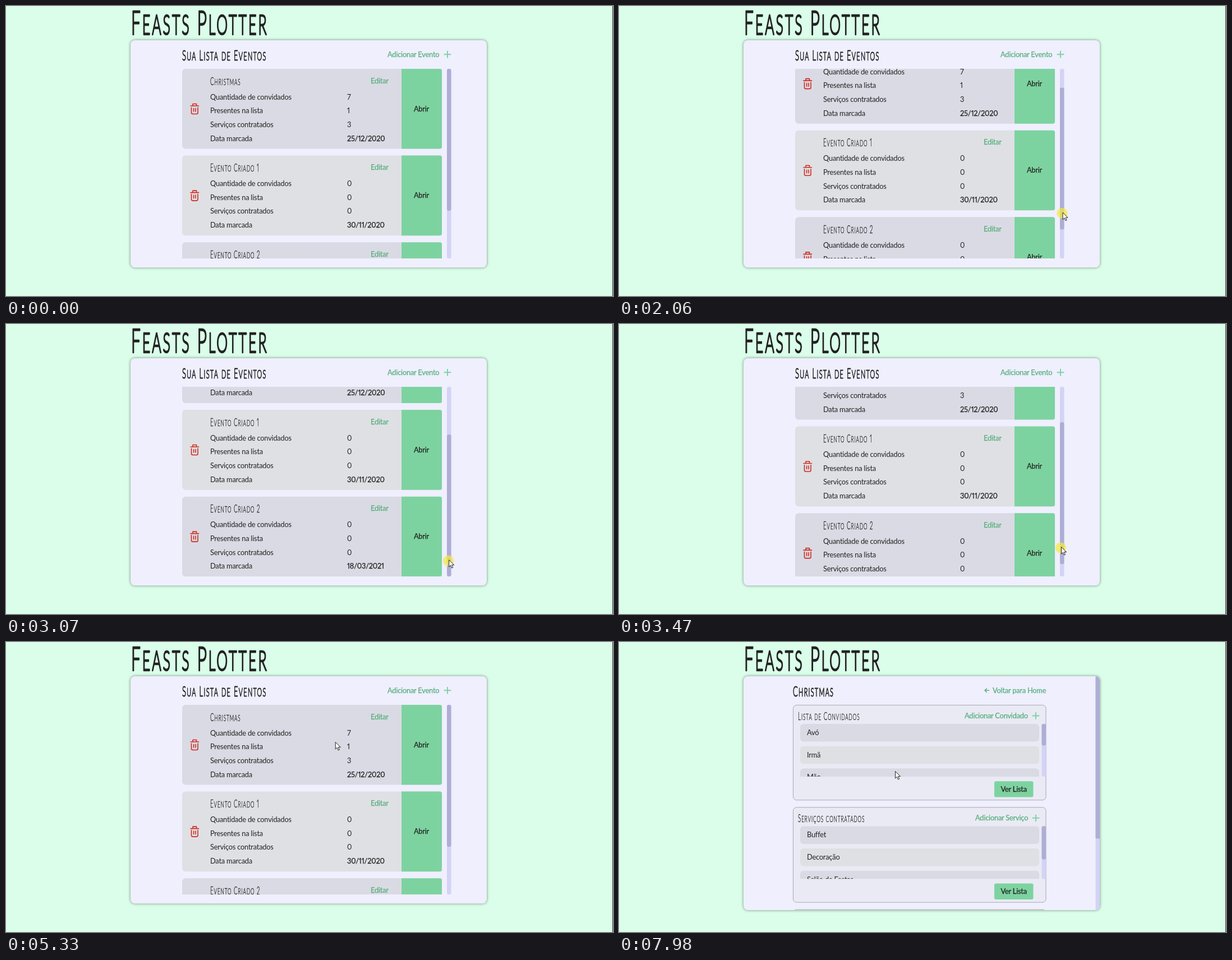
Recreate the animation shown at these times as an HTML page. Size 1082 px wide and 517 px high, loop 8000 ms.

```html
<!DOCTYPE html>
<html lang="pt-BR">
<head>
<meta charset="utf-8">
<title>Lista de Eventos</title>
<style>
  html, body { margin: 0; width: 100%; height: 100%; overflow: hidden; background: #dafee9; }
  svg { display: block; width: 1082px; height: 517px; }
  text { font: 12.8px Lato, sans-serif; letter-spacing: -.2px; font-variant-numeric: proportional-nums; fill: #222; }
  .semi { stroke: #222; stroke-width: .25px; }
  .link { fill: #55ae7c; stroke: #55ae7c; stroke-width: .25px; }
  .mid { text-anchor: middle; }
  .hand { font-weight: 300; letter-spacing: .1em; stroke: #222; stroke-width: .02em; stroke-linejoin: round; }
  .bold { stroke-width: .045em; }
  .panel { fill: #efeffe; filter: drop-shadow(0 0 2.5px #0007); }
  .plus { stroke: #7dd3a0; stroke-width: 2; }
  .trash { fill: none; stroke: #cf2a1e; stroke-width: 1.6; stroke-linecap: round; stroke-linejoin: round; }
  .status { font: 9px "Open Sans", sans-serif; letter-spacing: 0; fill: #fff; }
</style>
</head>
<body>
<svg id="stage" viewBox="0 0 1082 517"></svg>
<script>
const GREEN = '#7dd3a0', ODD = '#dadae4', EVEN = '#dfe0e4', TRACK = '#d3d3f5', THUMB = '#aeaed5';
const LOOP = 8000, DRAG_START = 1620, DRAG_END = 4400, CLICK = 6100, CLICK_END = 6250;
const PAGE_AT = 6350, TITLE_AT = 6510, LIST_TOP = 112, GRAB_Y = 334, THUMB_ROOM = 85;
const CONTENT_RATIO = 338 / 253;

const rect = (x, y, w, h, fill, rx = 0, extra = '') =>
  `<rect x="${x}" y="${y}" width="${w}" height="${h}" fill="${fill}" rx="${rx}" ${extra}/>`;
const text = (x, y, label, cls = '') => `<text x="${x}" y="${y}" class="${cls}">${label}</text>`;
const plus = (x, y) => `<path class="plus" d="M${x - 6.3} ${y}h12.6M${x} ${y - 6.3}v12.6"/>`;
const clip = (id, x, y, w, h, rx = 0) => `<clipPath id="${id}">${rect(x, y, w, h, '#000', rx)}</clipPath>`;

// Narrow handwritten-style face: tall capitals followed by slightly smaller ones.
function hand(x, y, size, label, cls = '') {
  const caps = label.replace(/[a-zà-ú]+/g, s => `<tspan font-size=".84em">${s.toUpperCase()}</tspan>`);
  return `<g transform="translate(${x} ${y}) scale(.5 1)">` +
    `<text class="hand ${cls}" style="font-size:${size}px">${caps}</text></g>`;
}

function eventCard(name, values, index) {
  const labels = ['Quantidade de convidados', 'Presentes na lista', 'Serviços contratados', 'Data marcada'];
  const rows = labels.map((label, i) => {
    const y = 54.5 + i * 24.7;
    return text(364, y, label) + text(608, y, values[i], i === 3 ? 'semi' : '');
  }).join('');
  return `<g transform="translate(0 ${LIST_TOP + index * 154.6})">
    ${rect(314, 0, 463, 142.6, index % 2 ? EVEN : ODD, 6)}
    <path fill="${GREEN}" d="M705 0h68.5q3.5 0 3.5 3.5v135.6q0 3.5 -3.5 3.5h-68.5z"/>
    <path class="trash" d="M329 66h14.5M333 65.5v-3h6.5v3M330.5 69v9q0 2.5 2.5 2.5h6.5q2.5 0 2.5 -2.5v-9M334.6 70.5v5.5M338 70.5v5.5"/>
    ${hand(364, 28.5, 19.4, name)}${text(650, 25.5, 'Editar', 'link')}
    ${text(740.5, 75.5, 'Abrir', 'semi mid')}${rows}</g>`;
}

function listBox(id, y, title, action, actionX, items, thumb) {
  const rows = items.map((item, i) => {
    const top = 146 + i * 39.7;
    return rect(323, top, 426, 31.6, i % 2 ? EVEN : ODD, 6) + text(335, top + 20, item);
  }).join('');
  return `<g transform="translate(0 ${y})">
    ${rect(310.5, 112.5, 450.5, 169.3, '#eaeaf4', 6, 'stroke="#a8a8b2"')}
    ${hand(319, 139, 19.4, title)}${text(actionX, 136, action, 'link')}${plus(743, 131.5)}
    ${clip(id, 311, 146, 450, 94)}<g clip-path="url(#${id})">${rows}</g>
    ${rect(753.5, 146, 7.5, 94, TRACK, 3)}${rect(753.5, 146, 7.5, thumb, THUMB, 3)}
    ${rect(669, 248.2, 69.5, 28.4, GREEN, 3)}${text(703.7, 266.7, 'Ver Lista', 'semi mid')}</g>`;
}

const homePage = `<g id="home">
  ${rect(222, 61, 635, 405.3, '#efeffe', 8, 'class="panel"')}
  ${hand(314, 96.5, 26, 'Sua Lista de Eventos', 'bold')}
  ${text(680, 90.5, 'Adicionar Evento', 'link')}${plus(787, 86.3)}
  ${clip('listClip', 314, LIST_TOP, 464, 338)}
  <g clip-path="url(#listClip)"><g id="list">
    ${eventCard('Christmas', [7, 1, 3, '25/12/2020'], 0)}
    ${eventCard('Evento Criado 1', [0, 0, 0, '30/11/2020'], 1)}
    ${eventCard('Evento Criado 2', [0, 0, 0, '18/03/2021'], 2)}
  </g></g>
  ${rect(786, LIST_TOP, 7.5, 338, TRACK, 3)}
  ${rect(786, LIST_TOP, 7.5, 253, THUMB, 3, 'id="thumb"')}</g>`;

const detailPage = `<g id="detail">
  ${rect(222, 61, 635, 417, '#efeffe', 8, 'class="panel"')}
  ${clip('panelClip', 222, 61, 635, 417, 8)}
  <g clip-path="url(#panelClip)">
    ${rect(849.5, 61, 8, 417, TRACK)}${rect(849.5, 61, 8, 289.5, THUMB, 2)}
    ${rect(310.5, 477, 450.5, 60, '#eaeaf4', 6, 'stroke="#a8a8b2"')}
  </g>
  <g id="eventTitle">${hand(310, 96.5, 26, 'Christmas', 'bold')}</g>
  <path d="M660 86.3h-8m3.8-3.8l-3.8 3.8l3.8 3.8" fill="none" stroke="#55ae7c" stroke-width="1.4"/>
  ${text(666, 90.5, 'Voltar para Home', 'link')}
  ${listBox('guests', 0, 'Lista de Convidados', 'Adicionar Convidado', 616, ['Avó', 'Irmã', 'Mãe'], 38.5)}
  ${listBox('services', 182.3, 'Serviços contratados', 'Adicionar Serviço', 635, ['Buffet', 'Decoração', 'Salão de Festas'], 59.5)}</g>`;

document.getElementById('stage').innerHTML = `
  ${rect(0, 0, 1082, 517, '#dafee9')}
  ${hand(223, 51, 59.5, 'Feasts Plotter', 'bold')}
  ${homePage}${detailPage}
  <g id="status">${rect(-4, 502, 361, 19, '#0a1a36', 3)}${text(2, 513.5, 'localhost:3000/event/3', 'status')}</g>
  ${rect(1081, 0, 1, 517, '#26332d')}
  <g id="cursor">
    <circle id="halo" cx="-.5" cy="2" r="9.5" fill="#f5e93c" opacity=".72"/>
    <path d="M.5 .5v12.5l2.9-2.7 2.1 4.7 2.1-.9-2.1-4.5h4z" fill="#fff" stroke="#222" stroke-width="1"/>
  </g>`;

// Pointer path: time, x, y
const PATH = [
  [0, 1012, 532], [70, 992, 512], [450, 880, 410], [830, 795, 333], [1150, 795, 333],
  [1390, 791, 334], [1640, 791, 334], [2530, 790, 405], [2900, 790, 420], [3100, 789, 420],
  [3470, 788, 397], [4090, 773, 341.5], [4250, 766, 333], [4940, 590, 205], [5100, 576, 198],
  [5400, 590, 172], [5800, 670, 160], [6050, 738, 184], [6300, 738, 205], [6430, 735, 243],
  [6590, 727, 236], [7510, 489, 137], [7980, 492, 230], [LOOP, 492, 230]
];

function pointerAt(t) {
  const i = PATH.findIndex(p => p[0] > t);
  const [a, b] = [PATH[i - 1], PATH[i]];
  const k = (t - a[0]) / (b[0] - a[0]);
  return [a[1] + (b[1] - a[1]) * k, a[2] + (b[2] - a[2]) * k];
}

const parts = Object.fromEntries(
  ['home', 'detail', 'eventTitle', 'list', 'thumb', 'status', 'cursor', 'halo']
    .map(id => [id, document.getElementById(id)]));
const show = (node, on) => node.setAttribute('display', on ? 'inline' : 'none');
const clamp = (v, lo, hi) => Math.min(hi, Math.max(lo, v));

function draw(t) {
  const [x, y] = pointerAt(t);
  const dragging = t >= DRAG_START && t < DRAG_END;
  const offset = dragging ? clamp(y - GRAB_Y, 0, THUMB_ROOM) : 0;
  parts.thumb.setAttribute('y', LIST_TOP + offset);
  parts.list.setAttribute('transform', `translate(0 ${-offset * CONTENT_RATIO})`);
  parts.cursor.setAttribute('transform', `translate(${x} ${y})`);
  show(parts.halo, dragging || (t >= CLICK && t < CLICK_END));
  show(parts.home, t < PAGE_AT);
  show(parts.detail, t >= PAGE_AT);
  show(parts.eventTitle, t >= TITLE_AT);
  parts.status.setAttribute('opacity', clamp((t - 5950) / 80, 0, 1) * clamp((7700 - t) / 300, 0, 1));
}

const start = performance.now();
function tick() {
  draw((performance.now() - start) % LOOP);
  requestAnimationFrame(tick);
}
tick();
</script>
</body>
</html>
```
